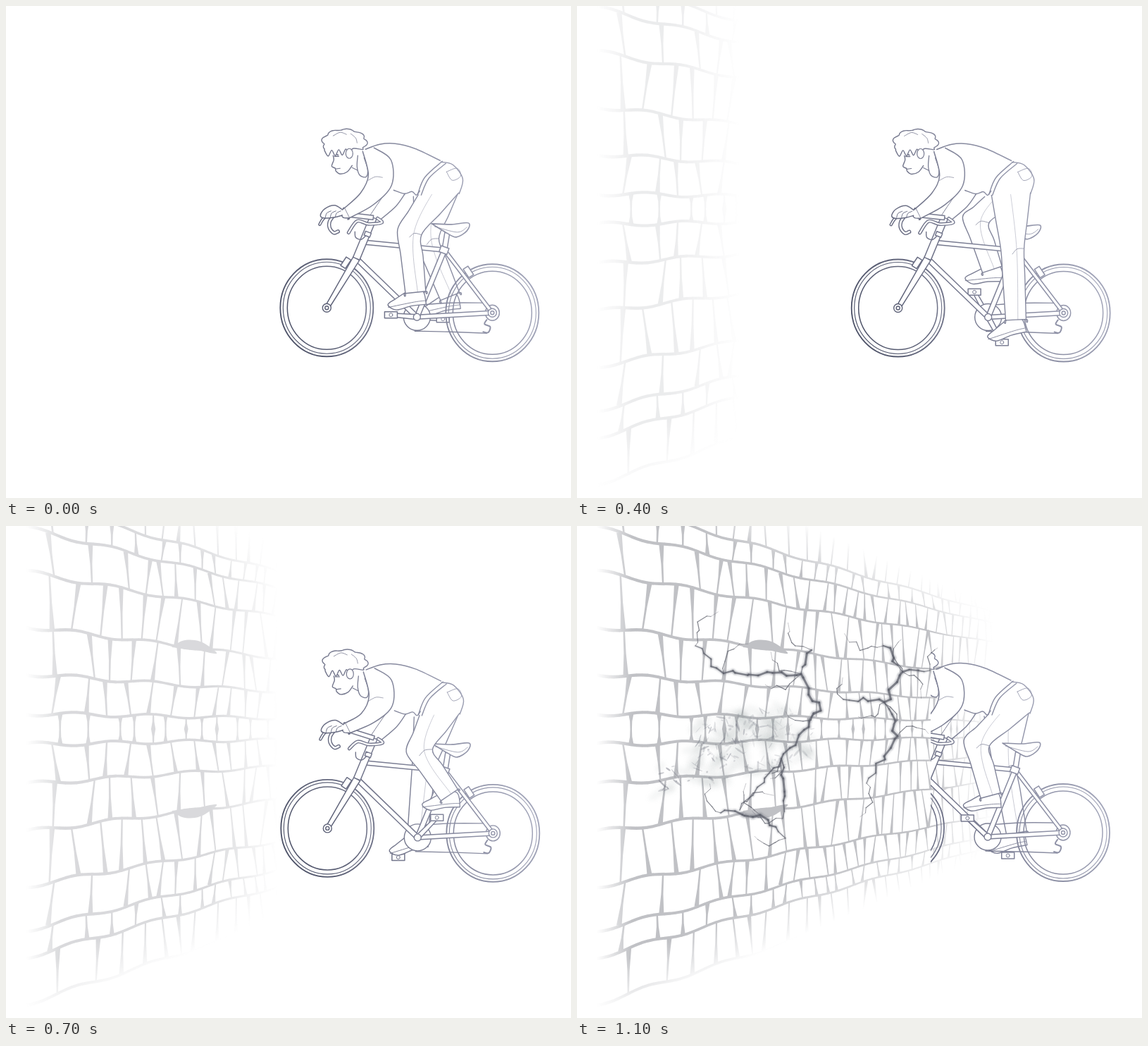
Write an HTML page with a canvas that moves like this. It is 802 px wide and 698 px high and loops after 1770 ms.

```html
<!DOCTYPE html>
<html lang="en">
<head>
<meta charset="utf-8">
<title>Cyclist and wall</title>
<style>
html, body { margin: 0; width: 100%; height: 100%; overflow: hidden; background: #fff; }
canvas { display: block; }
</style>
</head>
<body>
<canvas id="stage" width="802" height="698"></canvas>
<script>
const W = 802, H = 698, LOOP = 1770, STEP = 100, LAST = 11, HORIZON = 288;
const { PI, sin, cos, hypot } = Math;
const stage = document.getElementById('stage').getContext('2d');
const wall = Object.assign(document.createElement('canvas'), { width: W, height: H }).getContext('2d');
let c = stage;

const pts = s => s.split(' ').map(p => p.split(',').map(Number));
const mix = (a, b, f) => a.map((v, i) => v + (b[i] - v) * f);
const unit = ([x, y]) => [x / hypot(x, y), y / hypot(x, y)];
const minus = (a, b) => [a[0] - b[0], a[1] - b[1]];
const beside = (p, d, r) => [p[0] - d[1] * r, p[1] + d[0] * r];
const noise = n => { const v = sin(n * 127.1) * 43758.5; return v - Math.floor(v); };

// Smooth curve through every point.
function draw(shape, width = 1.4, filled = false) {
  const p = typeof shape === 'string' ? pts(shape) : shape;
  c.beginPath();
  c.moveTo(...p[0]);
  for (let i = 0; i < p.length - 1; i++) {
    const a = p[i - 1] || p[i], b = p[i], d = p[i + 1], e = p[i + 2] || d;
    c.bezierCurveTo(b[0] + (d[0] - a[0]) / 6, b[1] + (d[1] - a[1]) / 6,
      d[0] - (e[0] - b[0]) / 6, d[1] - (e[1] - b[1]) / 6, ...d);
  }
  if (filled) c.fill();
  if (width) { c.lineWidth = width; c.stroke(); }
}

function ring([x, y], rx, ry = rx, width = 1.4, filled = false) {
  c.beginPath();
  c.ellipse(x, y, rx, ry, 0, 0, 7);
  if (filled) c.fill();
  c.lineWidth = width;
  c.stroke();
}

function poly(...p) {
  c.beginPath();
  p.forEach(q => c.lineTo(...q));
  c.closePath();
  c.fill();
}

function tube(a, b, w1, w2 = w1) {
  const d = unit(minus(b, a));
  poly(beside(a, d, w1 / 2), beside(b, d, w2 / 2), beside(b, d, -w2 / 2), beside(a, d, -w1 / 2));
  c.lineWidth = 1.5;
  c.stroke();
}

function pipe(shape, width) {
  draw(shape, width);
  c.save();
  c.strokeStyle = '#fff';
  draw(shape, width - 2.8);
  c.restore();
}

// ---- Wall: courses run to the right in perspective, the lower half mirrors the upper ----
const courses = pts('-100,80 -34,122 4,138 66,165 143,214 210,250 266,277');
const thick = x => 4.8 - x / 190;

function courseY(i, x) {
  if (!courses[i]) return HORIZON;
  const [left, right] = courses[i], wave = sin((x - 125) / 17) * (i < 4 ? -1 : 1);
  return left + (right - left) * (x - 35) / 555 + wave * 3.4 * (1 - x / 800);
}

function halfWall() {
  courses.forEach((_, i) => {
    for (let x = 28; x < 600; x += 8) {
      const y1 = courseY(i, x), y2 = courseY(i, x + 8.5), t = thick(x) / 2;
      poly([x, y1 - t], [x + 8.5, y2 - t], [x + 8.5, y2 + t], [x, y1 + t]);
    }
    let seed = i * 40 + 3;
    for (let x = 50 + 30 * noise(seed); x < 590; x += 52 * Math.exp(-x / 350) * (.6 + .8 * noise(seed))) {
      const y1 = courseY(i, x), y2 = courseY(i + 1, x), h = y2 - y1;
      const lean = i < 6 ? (noise(++seed + .3) - .5) * h * .17 : (seed++, 0);
      const up = noise(seed + .6) > .4, t = thick(x), wide = t * .85, thin = t * .28;
      const a = up ? wide : thin, b = up ? thin : wide, m = t * .36;
      poly([x + lean - a, y1], [x + lean + a, y1], [x + m, y1 + h / 2], [x - lean + b, y2],
        [x - lean - b, y2], [x - m, y1 + h / 2]);
    }
  });
  draw('235,172 250,163 268,162 284,168 299,181 270,176 235,172', 0, true);
  draw('502,203 515,199 528,206 502,203', 0, true);
}

function paintWall(k) {
  c = wall;
  c.globalCompositeOperation = 'source-over';
  c.clearRect(0, 0, W, H);
  c.fillStyle = '#c0c1c5';
  halfWall();
  c.setTransform(1, 0, 0, -1, 0, 2 * HORIZON);
  halfWall();
  c.resetTransform();

  const edge = 25 + 51.5 * k, span = edge - 28;
  let g = c.createLinearGradient(28, 0, edge, 0);
  g.addColorStop(0, 'transparent');
  g.addColorStop(Math.min(.5, 50 / span), '#000');
  g.addColorStop(Math.max(.5, 1 - 95 / span), '#000');
  g.addColorStop(1, 'transparent');
  c.globalCompositeOperation = 'destination-in';
  c.fillStyle = g;
  c.fillRect(0, 0, W, H);

  // Fade out along the two slanted long sides.
  c.globalCompositeOperation = 'destination-out';
  for (const flip of [1, -1]) {
    const y = v => HORIZON + (v - HORIZON) * flip;
    g = c.createLinearGradient(303, y(62), 330, y(0));
    g.addColorStop(0, 'transparent');
    g.addColorStop(1, '#000');
    c.fillStyle = g;
    c.fillRect(0, 0, W, H);
  }
  c = stage;
  c.globalAlpha = (k - 1) / 10;
  c.drawImage(wall.canvas, 0, 0);
  c.globalAlpha = 1;
}

// ---- Cracks ----
const cracks = [
  '168,170 208,209 318,210 346,262 290,330 231,403', '333,176 318,210', '290,330 292,415',
  '378,246 436,250 462,207 501,205', '436,250 455,298 411,365', '435,170 462,207',
  '204,407 260,410 296,443'
].map(pts);

function crack(line, width) {
  c.lineCap = 'round';
  let last = line[0];
  line.slice(1).forEach((b, i) => {
    const a = line[i], n = Math.ceil(hypot(...minus(b, a)) / 11);
    for (let j = 1; j <= n; j++) {
      const q = mix(a, b, j / n), r = j < n ? 9 : 0;
      const next = [q[0] + (noise(q[0]) - .5) * r, q[1] + (noise(q[1]) - .5) * r];
      c.beginPath();
      c.moveTo(...last);
      c.lineTo(...next);
      c.lineWidth = width * (.35 + .65 * sin(PI * (i + j / n) / (line.length - 1)));
      c.stroke();
      last = next;
    }
  });
}

function twigs(line) {
  line.forEach(([x, y], i) => {
    const a = noise(x + i) * 2 * PI, r = 18 + 18 * noise(y);
    crack([[x, y], [x + cos(a) * r, y + sin(a) * r], [x + cos(a + .5) * r * 1.7, y + sin(a + .5) * r * 1.7]], 1.3);
  });
}

// Crumbled plaster: soft blobs and specks scattered along two bands.
function rubble() {
  c.fillStyle = '#777a86';
  for (let i = 0; i < 260; i++) {
    const soft = i < 90, f = noise(i), spread = noise(i + .3) - .5;
    const [x, y] = i % 2 ? mix([165, 300], [305, 274], f) : mix([118, 358], [335, 308], f);
    c.filter = soft ? 'blur(3px)' : 'blur(.6px)';
    c.globalAlpha = soft ? .07 : (.1 + .4 * noise(i + .5)) * (1.1 - .7 * f);
    c.beginPath();
    c.ellipse(x, y + spread * 44, soft ? 8 + 14 * noise(i + .7) : 1 + 7 * noise(i + .7),
      soft ? 6 : .5 + 1.2 * noise(i + .1), noise(i + .9) * 3, 0, 7);
    c.fill();
  }
  c.globalAlpha = 1;
}

function paintCracks() {
  c.save();
  rubble();
  c.filter = 'blur(1px)';
  c.strokeStyle = 'rgba(105,107,118,.25)';
  cracks.forEach(p => crack(p, 7));
  c.filter = 'blur(.6px)';
  c.strokeStyle = 'rgba(95,97,108,.75)';
  cracks.forEach(p => crack(p, 3));
  cracks.forEach(twigs);
  c.restore();
}

// ---- Bicycle ----
const front = [455, 428], rear = [690, 435], pivot = [583, 441], seat = [622, 346];
const crown = [497, 358], neck = [509, 335], stem = [521, 300];

function wheel(hub) {
  [[0, 1.8], [4, 1.1], [10, 1.5]].forEach(([inset, w]) => ring(hub, 66 - inset, 69 - inset, w));
}

function pedalAt(angle) {
  return [pivot[0] - cos(angle) * 37, pivot[1] + sin(angle) * 42];
}

function crank(angle) {
  const [x, y] = pedalAt(angle);
  tube(pivot, [x, y], 7, 5);
  tube([x - 9, y], [x + 9, y], 9);
  ring([x, y], 2.5, 2.5, 1);
}

function bike(drop) {
  wheel(rear);
  wheel(front);
  draw('585,424 630,421 682,421');
  draw('580,461 630,462 682,464');
  ring(rear, 10, 11);
  draw('682,445 679,451 687,455 684,463 677,462', 2);
  ring(pivot, 19, 19, 1.4, true);
  tube(seat, rear, 5);
  tube(pivot, rear, 6);
  tube(seat, pivot, 7);
  tube(crown, pivot, 7);
  tube(neck, seat, 6);
  tube([626, 320 + drop], seat, 7);
  tube([616, 344], [627, 348], 9);
  draw([[604, 307], [632, 308], [656, 306], [654, 317], [639, 326], [625, 320], [604, 307]]
    .map(([x, y]) => [x, y + drop]), 1.6, true);
  draw([[608, 311 + drop], [640, 319 + drop], [654, 312 + drop]], .8);
  tube(front, crown, 6, 10);
  tube(crown, stem, 10);
  [front, rear].forEach(hub => [6, 2.5].forEach(r => ring(hub, r, r, 1.4, true)));
  tube([478, 370], [486, 358], 8);
  tube([652, 371], [660, 383], 8);
}

function bars(grip) {
  const hold = s => pts(s).map(([x, y]) => [x, y + grip]);
  pipe([[486, 320 + grip * .8], [498, 305], [514, 309], [533, 307], [527, 301]], 5);
  draw('495,320 496,328 504,331 512,324');
  tube([509, 322], [517, 325], 6);
  tube([482, 294 + grip], stem, 6);
  pipe(hold('465,295 459,304 459,313 465,320 471,318'), 5.4);
  pipe(hold('445,308 450,300 459,292'), 4.4);
}

// ---- Rider ----
// The ankle follows the pedal; the knee moves forward as the leg shortens.
function leg(hipFront, hipBack, angle, shift) {
  const [px, py] = pedalAt(angle), ankle = [px + 25 + shift + 10 * cos(angle), py - 32];
  const heel = [ankle[0] + 15, ankle[1] + 17];
  const toe = [ankle[0] - 38, ankle[1] + 26 + 7 * sin(angle)];
  const sole = minus(toe, heel);
  const shoe = s => pts(s).map(([u, v]) =>
    [heel[0] + sole[0] * u - sole[1] * v, heel[1] + sole[1] * u + sole[0] * v]);
  draw(shoe('0,0 0,.25 .06,.4 .3,.46 .78,.27 1,.15 .8,-.02 .4,.02 0,0'), 1.4, true);
  draw(shoe('0,.1 .3,.11 1,.08'), .9);

  const hip = [613, 252], reach = hypot(...minus(ankle, hip));
  const knee = beside(mix(hip, ankle, .48), unit(minus(ankle, hip)), 4.5 * Math.sqrt(Math.max(0, 190 - reach)));
  const thigh = unit(minus(knee, hip)), shin = unit(minus(ankle, knee));
  const sum = [thigh[0] + shin[0], thigh[1] + shin[1]], bend = unit(sum);
  const r = 33 / Math.max(1.4, hypot(...sum));
  const kneeFront = beside(knee, bend, r), kneeBack = beside(knee, bend, -r);
  const hemFront = beside(ankle, shin, 14.5), hemBack = beside(ankle, shin, -14.5);
  draw([hipFront, mix(hipFront, kneeFront, .5), kneeFront, mix(kneeFront, hemFront, .4), hemFront, hemFront,
    hemBack, hemBack, mix(hemBack, kneeBack, .6), kneeBack, mix(kneeBack, hipBack, .5), hipBack], 1.4, true);
  draw([hip, mix(kneeFront, kneeBack, .68), mix(hemFront, hemBack, .6)], .45);
  draw([kneeBack, mix(kneeFront, kneeBack, .7), [knee[0], knee[1] + 7]], .8);
}

function torso() {
  draw('495,218 530,196 575,201 618,221 640,230 647,250 643,264 600,267 584,267 550,262 512,245', 0, true);
  draw('510,203 530,196 552,195 580,202 616,219', 1.5);
  draw('550,261 565,266 576,263 582,268 587,262');
  draw('584,267 594,243 619,220');
  draw('589,268 600,244 624,223');
  draw('617,221 634,225 648,245 643,266');
  draw('625,235 640,230 645,241 633,247 625,235', .9);
}

function arm(grip) {
  const wristTop = [480, 285 + grip], wristLow = [487, 299 + grip];
  draw([[506, 206], [514, 240], [503, 265], wristTop, wristTop, wristLow, wristLow,
    [521, 281 + grip * .5], [547, 254], [546, 218], [522, 201]], 1.5, true);
  draw('514,247 524,242 534,243', .7);
  c.save();
  c.translate(0, grip);
  draw('480,285 475,290 478,298 487,299', 1.4, true);
  draw('477,287 466,281 452,286 446,295 451,299 466,298 477,295', 1.5, true);
  for (let x = 453; x < 473; x += 7) draw([[x, 298], [x + 2, 292], [x + 8, 289]], 1);
  c.restore();
}

function head() {
  draw('500,210 455,206 464,214 462,227 467,230 468,234 474,238 486,234 500,230', 0, true);
  draw('499,212 498,228 502,240 511,242 513,231 508,215', 1.3, true);
  draw('464,212 465,218 462,227 467,230 468,234 474,238 484,235 491,226');
  draw('467,231 474,230', 1.1);
  draw('491,229 499,233', 1.1);
  draw('465,208 471,211', 1.7);
  draw('466,213 472,213', 1.4);
  // Curls round the skull, then a jagged fringe back to the forehead.
  const hair = [];
  for (let a = 2.6; a < 6.95; a += .13) {
    const r = .93 + .13 * Math.abs(sin(a * 4.2));
    hair.push([480 + cos(a) * 31 * r, 193 + sin(a) * 18 * r]);
  }
  for (let i = 0; i < 9; i++) hair.push([492 - i * 5, (i % 2 ? 210 : 202) + i * .4]);
  draw([...hair, hair[0]], 1.4, true);
  draw('464,184 474,179 483,182', .8);
  draw('489,181 496,187 498,194', .8);
  ring([487, 209], 5, 7, 1.2, true);
}

function paintRider(k) {
  // Each turn is quicker on the way down.
  const beat = cos(PI / 3 * (k - 2.2));
  const angle = (30 * k + 7 + 16.5 * beat) * PI / 180;
  const dip = Math.exp(-(((k - 2.4) / 1.4) ** 2));
  const grip = 30 * dip - 7 * sin(PI * k / LAST), drop = 12 * dip + 1;
  const ink = c.createLinearGradient(400, 450, 740, 330);
  ink.addColorStop(0, '#4c5167');
  ink.addColorStop(.4, '#74778d');
  ink.addColorStop(1, '#a6a9bd');

  c.save();
  if (k === LAST) {
    c.beginPath();
    c.rect(502, 0, W, H);
    c.clip();
  }
  c.strokeStyle = ink;
  c.fillStyle = '#fff';
  c.lineJoin = c.lineCap = 'round';
  c.translate(1 + beat, .7 * (1 + beat));
  crank(angle + PI);
  leg([578, 270], [641, 266], angle + PI, -5);
  bike(drop);
  draw('566,266 553,284 531,303');
  draw('536,268 525,284 517,296', 1);
  bars(grip);
  crank(angle);
  ring(pivot, 5, 5, 1.4, true);
  leg([587, 264], [643, 264], angle, 0);
  torso();
  head();
  arm(grip);
  c.restore();
}

let shown = -1;
function tick(now) {
  const k = Math.min(LAST, Math.floor(now % LOOP / STEP));
  if (k !== shown) {
    shown = k;
    c.fillStyle = '#fff';
    c.fillRect(0, 0, W, H);
    if (k > 1) paintWall(k);
    paintRider(k);
    if (k === LAST) paintCracks();
  }
  requestAnimationFrame(tick);
}
tick(0);
</script>
</body>
</html>
```
